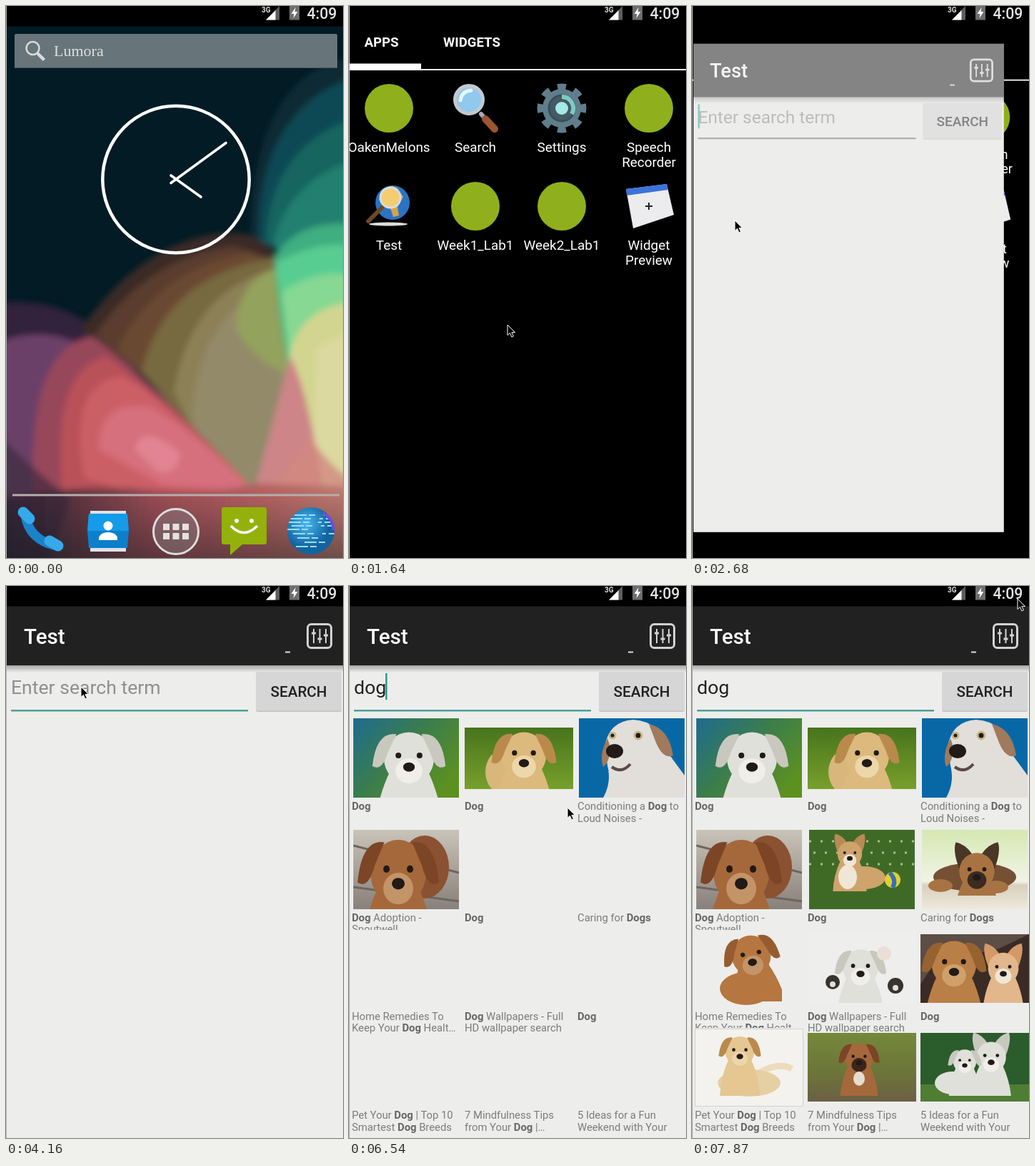
An HTML page without scripts that plays this animation: 472 by 772 pixels, repeating every 8000 ms.

```html
<!DOCTYPE html>
<html lang="en">
<head>
<meta charset="utf-8">
<title>Phone image search</title>
<style>
html,body{margin:0;width:100%;height:100%;overflow:hidden;background:#000}
body>svg{display:block;width:472px;height:772px}
text{font-family:Roboto,sans-serif;fill:#fff}
.mid{text-anchor:middle}
.label{font-size:18.9px;text-anchor:middle}
.tab{font-size:18.6px;font-weight:700}
.field{font-size:26.6px;fill:#222}
.cap text{font-size:14.8px;fill:#7b7b7b}
.cap tspan{font-weight:700;fill:#666}

/* 8 s timeline, every change is a hard step */
#clock,#apps,#win,#veil,#line,#caret,#mouse,.t{animation:8s step-end infinite}
#clock{animation-name:shrink;transform-origin:238px 242.5px}
#apps{animation-name:drawer;transform-origin:236px 455px}
#win{animation-name:open}
#veil{animation-name:veil}
#line{animation-name:line}
#caret{animation-name:caret}
#mouse{animation-name:move,show}
@keyframes shrink{
  0%{transform:none}
  16.74%{transform:translateY(12px) scale(.915)}
  18.61%,100%{transform:translateY(24px) scale(.83)}
}
@keyframes drawer{
  0%{opacity:0;transform:scale(1.12)}
  18.61%{opacity:.75;transform:scale(1.06)}
  20.49%{opacity:1;transform:none}
  33.49%{opacity:1;transform:scale(.96)}
  35.24%,100%{opacity:0}
}
@keyframes open{
  0%{visibility:hidden}
  33.49%{visibility:visible;transform:translate(2px,26.2px) scale(.919,.912)}
  35.24%,100%{visibility:visible;transform:none}
}
@keyframes veil{0%{opacity:.49}35.24%,100%{opacity:0}}
@keyframes line{0%{fill:#777}35.24%,100%{fill:#4ca197}}
@keyframes caret{
  0%{opacity:1;transform:none}
  40.86%{opacity:0;transform:none}
  46.49%{opacity:1;transform:none}
  51.99%{opacity:0;transform:none}
  57.61%{opacity:1;transform:translateX(15px)}
  59.36%{opacity:1;transform:translateX(30px)}
  63.11%{opacity:1;transform:translateX(44px)}
  66.86%{opacity:0;transform:translateX(44px)}
  76.11%{opacity:1;transform:translateX(44px)}
  83.49%{opacity:0;transform:translateX(44px)}
  90.99%{opacity:1;transform:translateX(44px)}
  96.61%,100%{opacity:0;transform:translateX(44px)}
}
@keyframes move{
  0%,5.61%{transform:translate(300px,560px);animation-timing-function:steps(4)}
  12.99%,16.74%{transform:translate(230px,726px);animation-timing-function:steps(2)}
  20.49%{transform:translate(222px,446px);animation-timing-function:steps(5)}
  29.74%,35.24%{transform:translate(60px,300px);animation-timing-function:steps(4)}
  42.86%,57.61%{transform:translate(105px,141px)}
  66.86%{transform:translate(180px,150px);animation-timing-function:steps(2)}
  70.49%{transform:translate(425px,162px)}
  72.36%,77.99%{transform:translate(402px,149px);animation-timing-function:steps(4)}
  85.36%{transform:translate(210px,471px);animation-timing-function:steps(2)}
  89.11%{transform:translate(230px,611px);animation-timing-function:steps(5)}
  98.36%,100%{transform:translate(456px,18px)}
}
@keyframes show{0%{opacity:0}5.61%{opacity:1}57.61%{opacity:0}66.86%,100%{opacity:1}}

#hint{animation-name:hint}
#d{animation-name:d}
#o{animation-name:o}
#g{animation-name:g}
#caps{animation-name:caps}
#pics1{animation-name:pics1}
#pics2{animation-name:pics2}
#pics3{animation-name:pics3}
#pics4{animation-name:pics4}
@keyframes hint{57.61%,100%{visibility:hidden}}
@keyframes d{0%{visibility:hidden}57.61%,100%{visibility:visible}}
@keyframes o{0%{visibility:hidden}59.36%,100%{visibility:visible}}
@keyframes g{0%{visibility:hidden}63.11%,100%{visibility:visible}}
@keyframes caps{0%{visibility:hidden}79.86%,100%{visibility:visible}}
@keyframes pics1{0%{visibility:hidden}81.61%,100%{visibility:visible}}
@keyframes pics2{0%{visibility:hidden}83.49%,100%{visibility:visible}}
@keyframes pics3{0%{visibility:hidden}87.24%,100%{visibility:visible}}
@keyframes pics4{0%{visibility:hidden}89.11%,100%{visibility:visible}}

.white{--c:#dfe0da;--e:#c9c8be;--m:#efeee8}
.gold{--c:#dcb97c;--e:#b98a4c;--m:#ecd6aa}
.brown{--c:#a5683a;--e:#7c4526;--m:#c39468}
.tan{--c:#cfa36c;--e:#b98a55;--m:#efe6d6}
.dark{--c:#a87343;--e:#4a3626;--m:#3b2b20}
</style>
</head>
<body>
<svg viewBox="0 0 472 772" xmlns="http://www.w3.org/2000/svg">
<defs>
  <filter id="soft" x="-10%" y="-10%" width="120%" height="120%"><feGaussianBlur stdDeviation="4"/></filter>
  <linearGradient id="floor"><stop stop-color="#2b2631"/><stop offset=".2" stop-color="#5a333f"/><stop offset=".45" stop-color="#9c4d55"/><stop offset=".75" stop-color="#b3605f"/><stop offset="1" stop-color="#bd7a70"/></linearGradient>
  <linearGradient id="fade" x2="0" y2="1"><stop stop-color="#101a20" stop-opacity="0"/><stop offset="1" stop-color="#101a20" stop-opacity=".45"/></linearGradient>
  <linearGradient id="shade" x2="0" y2="1"><stop stop-opacity=".3"/><stop offset="1" stop-opacity="0"/></linearGradient>
  <linearGradient id="meadow" x2="1" y2=".7"><stop stop-color="#1d6c90"/><stop offset=".5" stop-color="#3b7d4c"/><stop offset="1" stop-color="#5c9120"/></linearGradient>
  <linearGradient id="grass" x2="0" y2="1"><stop stop-color="#47741c"/><stop offset="1" stop-color="#78a02c"/></linearGradient>
  <linearGradient id="yard" x2="0" y2="1"><stop stop-color="#75883a"/><stop offset=".6" stop-color="#6c7439"/><stop offset="1" stop-color="#6b5f45"/></linearGradient>
  <linearGradient id="wood" x2="0" y2="1"><stop stop-color="#c9c3b8"/><stop offset="1" stop-color="#88807a"/></linearGradient>
  <linearGradient id="porch" x2="0" y2="1"><stop stop-color="#d5e8b2"/><stop offset=".65" stop-color="#f1f3e6"/><stop offset=".7" stop-color="#d9d0bd"/><stop offset="1" stop-color="#eee9dd"/></linearGradient>
  <radialGradient id="ball" cx=".4" cy=".35"><stop stop-color="#46b8ef"/><stop offset="1" stop-color="#12649f"/></radialGradient>
  <clipPath id="disc"><circle cx="427" cy="734" r="33"/></clipPath>
  <g id="pup">
    <path d="M-20 14Q-38 52-36 100H36Q38 52 20 14z" fill="var(--c)"/>
    <ellipse rx="26" ry="27" fill="var(--c)"/>
    <ellipse cy="13" rx="14" ry="13" fill="var(--m)"/>
    <circle cx="-11" cy="-3" r="3" fill="#211a16"/><circle cx="11" cy="-3" r="3" fill="#211a16"/>
    <ellipse cy="9" rx="6" ry="4.800" fill="#211a16"/>
  </g>
  <g id="flop">
    <use href="#pup"/>
    <path id="ear" d="M-13-25Q-34-28-38 8Q-28 14-22-6z" fill="var(--e)"/>
    <use href="#ear" transform="scale(-1 1)"/>
  </g>
  <g id="perk">
    <path id="tip" d="M-26-4Q-36-30-31-43Q-16-40-6-24z" fill="var(--e)"/>
    <use href="#tip" transform="scale(-1 1)"/><use href="#pup"/>
  </g>
  <circle id="bot" r="34" fill="#8fb01c"/>
</defs>

<g id="home">
  <rect width="472" height="772" fill="#021b24"/>
  <g filter="url(#soft)">
    <path d="M342 340Q340 100 480 72V360z" fill="#0b2c36"/>
    <path d="M354 330Q352 150 480 102V360z" fill="#0d4a55"/>
    <path d="M364 330Q370 200 480 160V380z" fill="#17655f"/>
    <path d="M374 335Q392 250 480 218V400z" fill="#22806f"/>
    <path d="M-10 415Q70 408 125 450L200 530 60 700H-10z" fill="#30223a"/>
    <path d="M105 452Q190 330 300 318Q370 312 385 370L400 520 350 682 190 515z" fill="#3a2a28"/>
    <path d="M125 460Q200 350 320 336L390 360 400 520 350 682 200 525z" fill="#5a3d2e"/>
    <path d="M155 480Q215 365 340 345L390 365 400 520 350 682 200 525z" fill="#6a4a31"/>
    <path d="M190 510Q225 370 390 350L410 520 350 682 240 570z" fill="#77693f"/>
    <path d="M235 540Q260 390 390 365L410 520 350 682 260 590z" fill="#8c8156"/>
    <path d="M262 590Q258 470 345 400L410 520 350 682z" fill="#938a6a"/>
    <path d="M322 450Q325 380 385 365L410 520Q345 500 322 450z" fill="#93a25b"/>
    <path d="M376 350Q410 300 480 305V460L400 530Q380 430 376 350z" fill="#3fae80"/>
    <path d="M378 360Q430 330 480 335V460L400 530z" fill="#59cd91"/>
    <path d="M386 400Q430 370 480 375V470L402 530z" fill="#86d892"/>
    <path d="M395 500Q405 425 480 415V690H420z" fill="#d2d58f"/>
    <path d="M434 480L480 455V690H430z" fill="#dcd9a0"/>
    <path d="M398 490Q425 540 445 690H345z" fill="#cd8588"/>
    <path d="M425 600Q450 640 480 660V700H350L400 640z" fill="#d18a80" opacity=".8"/>
    <path d="M-10 470Q60 445 115 480L200 620 30 690H-10z" fill="#6b4169"/>
    <path d="M40 700Q25 480 120 462Q180 500 350 680L300 740H60z" fill="#97475a"/>
    <path d="M80 690Q60 510 140 490Q190 520 350 680L280 720z" fill="#b95159"/>
    <path d="M110 660Q85 530 160 518Q210 535 350 680L240 700z" fill="#cc5f66"/>
    <path d="M130 620Q130 550 200 560Q260 590 350 680L220 670z" fill="#d5707b"/>
    <path d="M180 620Q190 580 245 625Q240 660 210 650z" fill="#e18493"/>
    <path d="M-10 690Q100 668 200 676Q300 682 350 668L480 672V780H-10z" fill="url(#floor)"/>
    <path d="M-10 600Q30 640 90 690L60 780H-10z" fill="#38263a" opacity=".6"/>
  </g>
  <rect y="680" width="472" height="92" fill="url(#fade)"/>
  <rect x="12" y="39" width="452" height="48" rx="2" fill="#67757a"/>
  <path d="M12 86.5H464" stroke="#46555a"/>
  <g fill="none" stroke="#d8dcdd" stroke-width="2.500"><circle cx="37.500" cy="59" r="9"/><path d="M44 66l9.500 9.500" stroke-width="4.500"/></g>
  <text x="67" y="70" style="font:22px 'Liberation Serif',serif;fill:#dcdfe0">Lumora</text>
  <g id="clock" fill="none" stroke="#fff" stroke-linecap="round">
    <circle cx="238" cy="242.500" r="102.700" stroke-width="4.500"/>
    <path d="M231 247.500L308 191.500M231 237L273 267" stroke-width="3.600"/>
  </g>
  <path d="M9 684H467" stroke="#b4aeac" stroke-width="3"/>
  <g fill="none" stroke-linecap="round">
    <path d="M27 712Q32 746 70 755" stroke="#1b82c8" stroke-width="13"/>
    <path d="M24 708l9 9M61 748l12 7" stroke="#35a9ea" stroke-width="15"/>
  </g>
  <path d="M118 706h50v57h-50z" fill="#dfe3e6"/>
  <path d="M116 710h54l2 24-2 24h-54l-2-24z" fill="#0c7fcb"/><path d="M116 710h54l2 24H114z" fill="#159be8"/>
  <g fill="#fff"><circle cx="143" cy="727" r="6.500"/><path d="M130 747v-4q3-7 13-7t13 7v4z"/></g>
  <circle cx="238" cy="735" r="31.500" fill="#8886" stroke="#ddd" stroke-width="3"/>
  <path d="M220 728.500h36M220 741.500h36" stroke="#e4e1e1" stroke-width="9" stroke-dasharray="9 4.500"/>
  <path d="M305 701h57q3 0 3 3v46q0 3-3 3h-31l-17 15v-15h-9q-3 0-3-3v-46q0-3 3-3z" fill="#93b10a"/>
  <path d="M315 727q18 19 37 0" fill="none" stroke="#fff" stroke-width="3.500"/><circle cx="323" cy="720" r="3" fill="#fff"/><circle cx="344" cy="720" r="3" fill="#fff"/>
  <circle cx="427" cy="734" r="33" fill="url(#ball)"/>
  <g clip-path="url(#disc)" stroke="#9bdcff" stroke-width="1.800" stroke-dasharray="17 3 9 12 5 4">
    <path d="M404 712h50M398 717h60M396 722h60M400 727h62M394 732h40M402 738h58M408 744h40M418 750h44M406 756h38"/>
  </g>
  <path d="M444 709q14 8 15 24" fill="none" stroke="#6a4ee0" stroke-width="4"/>
</g>

<g id="apps">
  <path d="M-40-20H520V820H-40z"/>
  <text class="tab" x="21.500" y="56.500">APPS</text><text class="tab" x="132" y="56.500">WIDGETS</text>
  <path d="M-20 89H500" stroke="#fff" stroke-width="2"/><path d="M1 80.500h100v9H1z" fill="#fff"/>
  <use href="#bot" x="56" y="143"/><use href="#bot" x="420" y="143"/><use href="#bot" x="177" y="280"/><use href="#bot" x="298" y="280"/>
  <g stroke-linecap="round">
    <path d="M185 151l7 8" stroke="#aab" stroke-width="6"/><path d="M191 158l13 14" stroke="#9c5530" stroke-width="10"/>
    <circle cx="168" cy="131" r="19.500" fill="#8fc9ee" stroke="#c3c9cf" stroke-width="5"/>
    <path d="M156 132q2-13 15-14" fill="none" stroke="#e8f6ff" stroke-width="5"/>
  </g>
  <g fill="none" transform="rotate(-11.250 298 143)">
    <circle cx="298" cy="143" r="30" stroke="#607d8b" stroke-width="9" pathLength="16" stroke-dasharray="1 1" transform="rotate(-90 298 143)"/>
    <circle cx="298" cy="143" r="27" fill="#607d8b"/>
  </g>
  <circle cx="298" cy="143" r="18" fill="#455a64" stroke="#38505b" stroke-width="3"/>
  <path d="M298 127a16 16 0 0 1 14 24" fill="none" stroke="#80cbc4" stroke-width="6"/><circle cx="298" cy="143" r="9" fill="#a5e8e6"/>
  <ellipse cx="55" cy="305" rx="27" ry="2.500" fill="#ddd"/>
  <circle cx="61" cy="275" r="24" fill="#2a74c4"/>
  <path d="M46 258q14-10 22-3l8 12-8 14 2 12-8 2-6-18-14-6z" fill="#d5a24c"/>
  <path d="M47 281L27 301" stroke="#6b4a24" stroke-width="6" stroke-linecap="round"/>
  <circle cx="58" cy="268" r="14" fill="#f3cd70" stroke="#d9dce0" stroke-width="3"/>
  <path d="M388 256l57-7 10 43-57 19z" fill="#ececee"/><path d="M388 256l57-7 2 8-58 8z" fill="#3d73d8"/>
  <path d="M415 280h10M420 275v10" stroke="#222" stroke-width="2"/>
  <g class="label">
    <text x="56" y="204">OakenMelons</text><text x="177" y="204">Search</text><text x="298" y="204">Settings</text>
    <text x="420" y="204">Speech</text><text x="420" y="225">Recorder</text>
    <text x="56" y="341">Test</text><text x="177" y="341">Week1_Lab1</text><text x="298" y="341">Week2_Lab1</text>
    <text x="420" y="341">Widget</text><text x="420" y="362">Preview</text>
  </g>
</g>

<path d="M0 0H472V28.500H0z"/>
<text x="358" y="8.500" style="font-size:10px;font-weight:700;fill:#ddd">3G</text>
<path d="M364 19.500L383 0V19.500z" fill="#5d5d5d"/><path d="M364 19.500L377.500 6V19.500z" fill="#fff"/>
<path d="M397 0h14v19.500h-14z" fill="#6e6e6e"/><path d="M405.500 2l-6 9h4l-1 6 6-9h-4z" fill="#fff"/>
<text x="421.500" y="17.500" style="font-size:21.300px;font-weight:500;fill:#e4e4e4">4:09</text>

<g id="win">
  <path d="M0 29H473V778H0z" fill="#ededec"/>
  <path d="M0 111h473v10H0z" fill="url(#shade)"/>
  <path d="M0 28.500h473V111H0z" fill="#212121"/>
  <text x="25" y="80.500" style="font-size:29.600px;font-weight:500">Test</text>
  <path d="M391 92.500h7" stroke="#ddd" stroke-width="2"/>
  <g fill="none" stroke="#d2d2d2">
    <rect x="422.500" y="53.500" width="33" height="33" rx="5" stroke-width="3"/>
    <path d="M431 60v20M439.500 60v20M448 60v20" stroke-width="2"/><path d="M428 66h6M436.500 74h6M445 69h6" stroke-width="3"/>
  </g>
  <rect x="350" y="121" width="120" height="55" rx="3" fill="#c2c2c2"/><rect x="350" y="120" width="120" height="54.500" rx="3" fill="#d6d6d6"/>
  <text class="mid" x="410" y="155" style="font-size:20.700px;font-weight:500;fill:#212121">SEARCH</text>
  <path id="line" d="M7 173h332v2.600H7z"/>
  <text class="field t" id="hint" x="7" y="151" style="fill:#8f8f8f">Enter search term</text>
  <text class="field" x="7" y="151"><tspan class="t" id="d">d</tspan><tspan class="t" id="o">o</tspan><tspan class="t" id="g">g</tspan></text>
  <path id="caret" d="M7 122h2.500v37H7z" fill="#2a9d8f"/>

  <g class="cap t" id="caps">
    <text x="4" y="313"><tspan>Dog</tspan></text><text x="162" y="313"><tspan>Dog</tspan></text>
    <text x="320" y="313">Conditioning a <tspan>Dog</tspan> to</text><text x="320" y="329.500">Loud Noises -</text>
    <text x="4" y="468.500"><tspan>Dog</tspan> Adoption -</text><text x="4" y="485">Snoutwell</text>
    <path d="M1 481h156v14H1z" fill="#ededec"/>
    <text x="162" y="468.500"><tspan>Dog</tspan></text><text x="320" y="468.500">Caring for <tspan>Dogs</tspan></text>
    <text x="4" y="606.500">Home Remedies To</text><text x="4" y="623">Keep Your <tspan>Dog</tspan> Healt…</text>
    <text x="162" y="606.500"><tspan>Dog</tspan> Wallpapers - Full</text><text x="162" y="623">HD wallpaper search</text>
    <text x="320" y="606.500"><tspan>Dog</tspan></text>
    <text x="4" y="745">Pet Your <tspan>Dog</tspan> | Top 10</text><text x="4" y="761.500">Smartest <tspan>Dog</tspan> Breeds</text>
    <text x="162" y="745">7 Mindfulness Tips</text><text x="162" y="761.500">from Your <tspan>Dog</tspan> |…</text>
    <text x="320" y="745">5 Ideas for a Fun</text><text x="320" y="761.500">Weekend with Your</text>
  </g>

  <g class="t" id="pics1">
    <svg x="6" y="185" width="148" height="111"><rect width="148" height="111" fill="url(#meadow)"/><use href="#flop" class="white" transform="translate(78 56) scale(1.35)"/></svg>
    <svg x="162" y="198" width="152" height="86"><rect width="152" height="86" fill="url(#grass)"/><ellipse cx="56" cy="62" rx="27" ry="32" fill="#d8b67c"/><use href="#flop" class="gold" transform="translate(83 39) scale(1.2)"/></svg>
    <svg x="322" y="185" width="148" height="111">
      <rect width="148" height="111" fill="#0868a6"/>
      <path d="M36 40Q42 4 76 2Q116 4 126 50L148 80V111H34Q46 90 40 66z" fill="#e2deda"/>
      <path d="M98 8Q126 14 132 52Q118 58 108 34zM40 28Q28 50 34 68Q44 60 44 40z" fill="#a07a5c"/>
      <ellipse cx="50" cy="46" rx="12" ry="10" fill="#211a16"/><path d="M46 68q14 10 26-4" fill="none" stroke="#5a4a44" stroke-width="4"/>
      <g fill="#211a16" stroke="#c9b98a" stroke-width="3"><circle cx="83" cy="24" r="5"/><circle cx="47" cy="24" r="4"/></g>
    </svg>
    <svg x="6" y="341" width="148" height="111"><rect width="148" height="111" fill="url(#wood)"/><path d="M0 22L148 60M0 80L148 100" stroke="#6d655e" stroke-width="3"/><ellipse cx="100" cy="52" rx="34" ry="44" fill="#8a5230"/><use href="#flop" class="brown" transform="translate(63 60) scale(1.5 1.7)"/></svg>
  </g>
  <g class="t" id="pics2">
    <svg x="164" y="341" width="148" height="111"><rect width="148" height="111" fill="#3f6a26"/><path d="M0 16h148M6 32h148M0 48h148" stroke="#a9bd92" stroke-width="3" stroke-dasharray="3 13"/><ellipse cx="77" cy="67" rx="30" ry="16" fill="#cfa36c"/><svg width="148" height="86"><use href="#perk" class="tan" transform="translate(57 34) scale(.66)"/></svg><ellipse cx="54" cy="66" rx="13" ry="17" fill="#efe6d6"/><circle cx="117" cy="70" r="11" fill="#e4cf31"/><path d="M113 60q10 10 4 21" fill="none" stroke="#3273b5" stroke-width="6"/></svg>
    <svg x="322" y="341" width="148" height="111"><rect width="148" height="111" fill="url(#porch)"/><ellipse cx="74" cy="66" rx="58" ry="20" fill="#755033"/><ellipse cx="26" cy="78" rx="17" ry="9" fill="#a87343"/><ellipse cx="104" cy="80" rx="17" ry="9" fill="#a87343"/><svg width="148" height="92"><use href="#perk" class="dark" transform="translate(77 58) scale(.95)"/></svg></svg>
    <svg x="36" y="481" width="90" height="105"><ellipse cx="40" cy="82" rx="37" ry="23" fill="#b5763f"/><svg width="90" height="100"><use href="#flop" class="brown" transform="translate(47 36) rotate(-10) scale(1.050)" style="--c:#b5763f;--e:#965c30"/></svg></svg>
    <svg x="162" y="484" width="152" height="99"><rect width="152" height="99" fill="#eeeeec"/><use href="#flop" class="white" transform="translate(74 50) scale(.95)"/><circle cx="107" cy="30" r="10" fill="#e9dfd6"/><g fill="#38332f"><circle cx="35" cy="70" r="10"/><circle cx="123" cy="75" r="11"/></g><g fill="#dfe0da"><circle cx="35" cy="73" r="4"/><circle cx="123" cy="78" r="4"/></g></svg>
  </g>
  <svg class="t" id="pics3" x="320" y="487" width="152" height="96"><rect width="152" height="96" fill="#3a2b26"/><path d="M0 0h152L110 20 20 40 0 70z" fill="#5c4d45"/><use href="#flop" class="gold" transform="translate(47 42) scale(1.200)" style="--c:#b97f46;--e:#96622f;--m:#d0a06a"/><use href="#perk" class="tan" transform="translate(116 48) scale(.82)" style="--c:#e2b78c;--e:#d39a68"/></svg>
  <g class="t" id="pics4">
    <path d="M1 618h159v111H1zM160 624h160v98H160z" fill="#ededec"/>
    <svg x="4" y="619" width="152" height="109"><rect x=".5" y=".5" width="151" height="108" fill="#f3f2ee" stroke="#d2d2d0"/><path d="M90 62q26-16 46-6" fill="none" stroke="#ecdcbc" stroke-width="9"/><ellipse cx="76" cy="76" rx="44" ry="19" fill="#e6cfa2"/><svg width="152" height="94"><use href="#flop" class="gold" transform="translate(63 32) scale(.78)" style="--c:#e4c791"/></svg></svg>
    <svg x="162" y="625" width="152" height="96"><rect width="152" height="96" fill="url(#yard)"/><svg width="152" height="88"><use href="#flop" class="brown" transform="translate(72 35) scale(.76)" style="--m:#3b261b"/><ellipse cx="72" cy="64" rx="8" ry="10" fill="#e6ddd0"/></svg></svg>
    <svg x="320" y="625" width="152" height="96"><rect width="152" height="96" fill="#2b5c2c"/><path d="M0 72h152v24H0z" fill="#4f7d34"/><svg width="152" height="88"><use href="#perk" class="white" transform="translate(99 34) scale(.8)"/><use href="#flop" class="white" transform="translate(62 40) scale(.62)"/><ellipse cx="45" cy="70" rx="25" ry="16" fill="#dfe0da"/></svg></svg>
  </g>
  <path id="veil" d="M0 29H473V778H0z" fill="#ececec"/>
</g>

<path d="M0 0h1v772H0z" fill="#b0b0b0"/>
<path id="mouse" d="M0 0V14.500l3.400-3.200 2.500 5.600 2.500-1.100-2.500-5.400H10.500z" fill="#000" stroke="#fff"/>
</svg>
</body>
</html>
```
